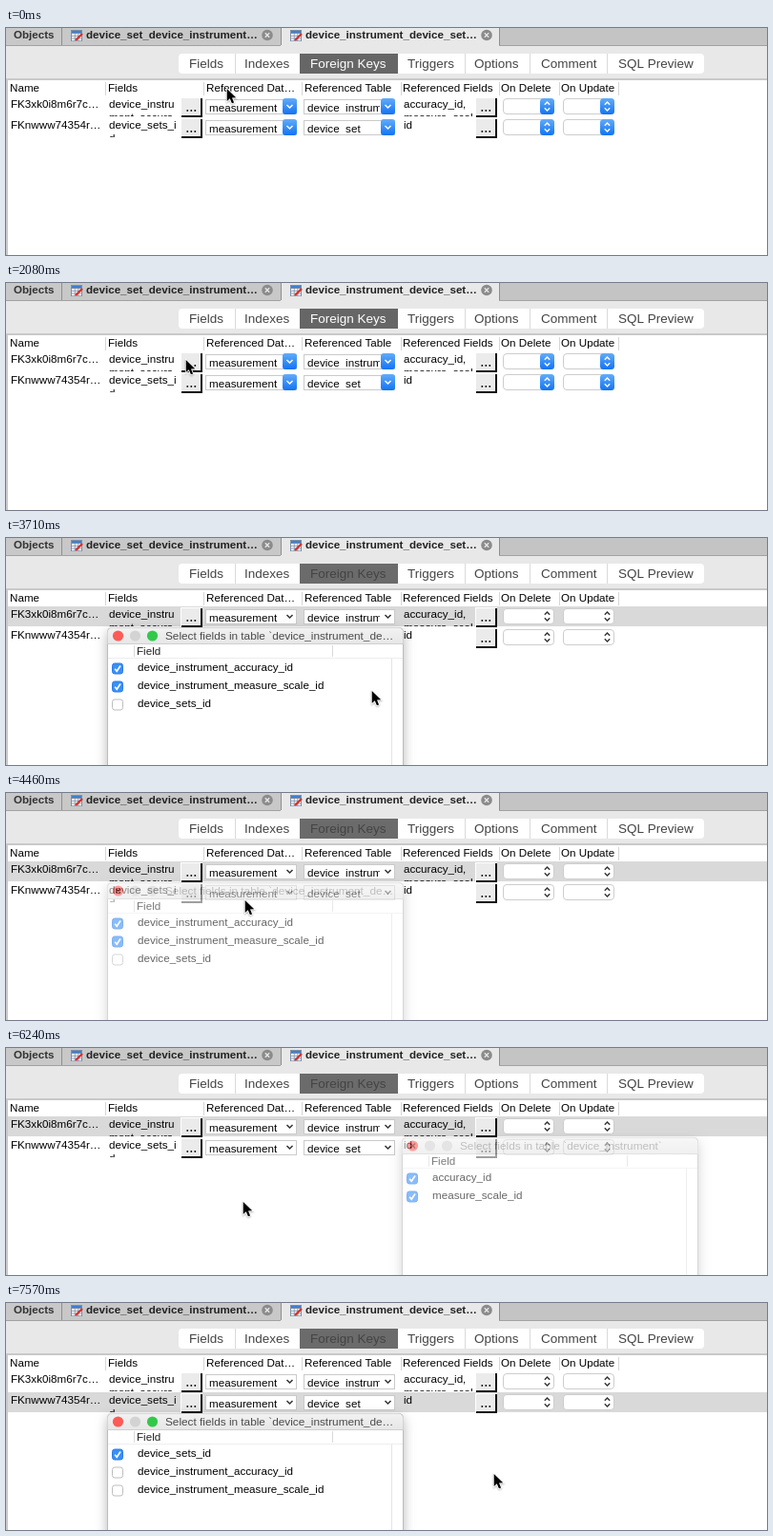
An HTML page with a canvas that plays this animation: 798 px wide and 239 px high, repeating every 8000 ms.

```html
<!DOCTYPE html>
<html lang="en">
<head>
<meta charset="utf-8">
<title>Foreign key editor</title>
<style>
html, body { margin: 0; width: 100%; height: 100%; overflow: hidden; background: #fff; }
canvas { display: block; width: 798px; height: 239px; }
</style>
</head>
<body>
<canvas id="stage" width="798" height="239"></canvas>
<script>
const ctx = document.getElementById('stage').getContext('2d');
const layer = document.createElement('canvas');
const LOOP = 8000;
const FACE = '"Liberation Sans", Arial, sans-serif';
const BODY = `11.65px ${FACE}`;
const TITLE = `11.8px ${FACE}`;
const BOLD = `bold 11.6px ${FACE}`;
const SEGMENT = `13.5px ${FACE}`;

const DIALOGS = {
  first: {
    x: 106, y: 94, title: 'Select fields in table `device_instrument_de…',
    fields: [['device_instrument_accuracy_id', true], ['device_instrument_measure_scale_id', true], ['device_sets_id', false]]
  },
  second: {
    x: 415, y: 94, title: 'Select fields in table `device_instrument`',
    fields: [['accuracy_id', true], ['measure_scale_id', true]]
  },
  third: {
    x: 106, y: 116, title: 'Select fields in table `device_instrument_de…',
    fields: [['device_sets_id', true], ['device_instrument_accuracy_id', false], ['device_instrument_measure_scale_id', false]]
  }
};

// Each phase holds until the next one starts.
const PHASES = [
  { at: 0, row: -1, active: true },
  { at: 2230, row: 0, active: true },
  { at: 2380, row: 0, dialog: 'first' },
  { at: 4457, row: 0, dialog: 'first', closing: true, alpha: 0.6 },
  { at: 4605, row: 0, active: true },
  { at: 4752, row: 0, dialog: 'second', alpha: 0.6 },
  { at: 4900, row: 0, dialog: 'second' },
  { at: 6238, row: 0, dialog: 'second', closing: true, alpha: 0.6 },
  { at: 6386, row: 0, active: true },
  { at: 6683, row: 1, active: true },
  { at: 6831, row: 1, dialog: 'third', alpha: 0.6 },
  { at: 6980, row: 1, dialog: 'third' }
];

// Pointer strokes: evenly timed stops between the first and last moment.
const STROKES = [
  [0, 0, [[231, 63]]],
  [150, 450, [[206, 77], [168, 86], [187, 84]]],
  [1050, 2080, [[205, 84], [240, 86], [268, 87], [285, 85], [286, 86], [255, 84], [215, 82], [188, 80]]],
  [2680, 3120, [[175, 108], [152, 146], [146, 164], [145, 134]]],
  [3420, 3420, [[146, 149]]],
  [3710, 4010, [[383, 160], [430, 161], [442, 156]]],
  [4310, 4900, [[117, 102], [250, 112], [420, 95], [495, 87], [495, 86]]],
  [5200, 5640, [[490, 110], [479, 140], [474, 162], [480, 150]]],
  [5940, 6980, [[450, 118], [425, 101], [248, 161], [215, 130], [192, 107], [190, 102], [188, 104], [176, 121]]],
  [7130, 7570, [[230, 150], [350, 175], [470, 178], [511, 179]]]
];

function pointerAt(t) {
  const [from, to, stops] = STROKES.filter(s => s[0] <= t + 2).pop();
  const last = stops.length - 1;
  const step = last ? Math.floor((t + 4 - from) / (to - from) * last) : 0;
  return stops[Math.max(0, Math.min(last, step))];
}

function rect(x, y, w, h, color) {
  ctx.fillStyle = color;
  ctx.fillRect(x, y, w, h);
}

function round(x, y, w, h, r, fill, stroke) {
  ctx.beginPath();
  ctx.roundRect(x, y, w, h, r);
  if (fill) { ctx.fillStyle = fill; ctx.fill(); }
  if (stroke) { ctx.strokeStyle = stroke; ctx.lineWidth = 1; ctx.stroke(); }
}

function disc(x, y, r, color) {
  ctx.beginPath();
  ctx.arc(x, y, r, 0, Math.PI * 2);
  ctx.fillStyle = color;
  ctx.fill();
}

function line(points, color, width) {
  ctx.beginPath();
  points.forEach(([x, y]) => ctx.lineTo(x, y));
  ctx.strokeStyle = color;
  ctx.lineWidth = width;
  ctx.stroke();
}

function cross(x, y, r, color, width) {
  line([[x - r, y - r], [x + r, y + r]], color, width);
  line([[x - r, y + r], [x + r, y - r]], color, width);
}

function text(str, x, y, font = BODY, color = '#000') {
  ctx.font = font;
  ctx.fillStyle = color;
  ctx.fillText(str, x, y);
}

function clipped(x, y, w, h, draw) {
  ctx.save();
  ctx.beginPath();
  ctx.rect(x, y, w, h);
  ctx.clip();
  draw();
  ctx.restore();
}

function shade(y, h, top, bottom) {
  const g = ctx.createLinearGradient(0, y, 0, y + h);
  g.addColorStop(0, top);
  g.addColorStop(1, bottom);
  return g;
}

const blue = (y, h) => shade(y, h, '#62acf9', '#1273f4');

function tableIcon(x, y) {
  rect(x, y, 12, 12, '#7d8fa8');
  rect(x + 1, y + 1, 10, 2, '#3f7fd0');
  for (let i = 0; i < 9; i++) {
    rect(x + 1 + (i % 3) * 3.6, y + 4 + Math.floor(i / 3) * 2.7, 2.8, 1.9, '#f4f8fd');
  }
  line([[x + 5, y + 11], [x + 12, y + 4]], '#d8322a', 2.4);
}

function tab(x, label) {
  tableIcon(x, 2);
  text(label, x + 16, 11, BOLD, '#222');
  disc(x + 206, 7.5, 5.8, '#8b8b8b');
  cross(x + 206, 7.5, 2.2, '#e6e6e6', 1.4);
}

function tabBar() {
  rect(0, 0, 798, 19, '#c4c4c4');
  rect(0, 0, 288, 18, '#c8c8c8');
  rect(0, 18, 798, 1, '#a2a2a2');
  rect(288, 0, 229, 19, '#e8e8e8');
  [58, 288, 517].forEach(x => rect(x, 0, 1, 18, '#8e8e8e'));
  text('Objects', 8, 11, BOLD, '#333');
  tab(68, 'device_set_device_instrument…');
  tab(298, 'device_instrument_device_set…');
}

function segments(active) {
  rect(0, 19, 798, 37, '#e8e8e8');
  round(181, 27, 551, 21, 4, '#fff');
  [240, 481, 549, 630].forEach(x => rect(x, 27, 1, 21, '#dadada'));
  rect(308, 27, 103, 21, active ? '#666' : '#6b6b6b');
  const labels = [['Fields', 192], ['Indexes', 250], ['Foreign Keys', 319], ['Triggers', 421],
    ['Options', 491], ['Comment', 561], ['SQL Preview', 642]];
  labels.forEach(([label, x]) => {
    const lit = active && label === 'Foreign Keys';
    text(label, x, 42, SEGMENT, lit ? '#fff' : '#444');
  });
}

function header() {
  rect(0, 53, 798, 186, '#c9c9c9');
  rect(2, 55, 796, 184, '#fff');
  const names = [['Name', 4], ['Fields', 107], ['Referenced Dat…', 210], ['Referenced Table', 313],
    ['Referenced Fields', 416], ['On Delete', 519], ['On Update', 582]];
  names.forEach(([name, x]) => text(name, x, 67));
  [104, 207, 310, 414, 517, 580, 642].forEach(x => rect(x, 57, 1, 14, '#d6d6d6'));
}

function moreButton(x, y) {
  rect(x, y, 23, 21, '#fff');
  rect(x + 1, y + 1, 22, 20, '#111');
  rect(x + 1, y + 1, 20, 18, '#ebebeb');
  for (let i = 0; i < 3; i++) rect(x + 6.5 + i * 4, y + 13, 1.6, 1.8, '#111');
}

function combo(x, y, label, active) {
  rect(x, y, 96, 16, '#cacaca');
  rect(x + 1, y + 1, 94, 14, '#fff');
  clipped(x + 1, y, 79, 14, () => text(label, x + 4, y + 13));
  if (active) round(x + 81, y - 1, 15, 17, 3, blue(y - 1, 17));
  line([[x + 85.5, y + 6], [x + 88.5, y + 9], [x + 91.5, y + 6]], active ? '#fff' : '#333', 1.5);
}

function popup(x, y, active) {
  round(x + 0.5, y + 0.5, 53, 16, 3.5, '#fff', '#cdcdcd');
  if (active) round(x + 39, y, 15, 17, 3.5, blue(y, 17));
  const color = active ? '#fff' : '#333';
  const cx = x + 46.5;
  line([[cx - 2.7, y + 6.7], [cx, y + 4], [cx + 2.7, y + 6.7]], color, 1.4);
  line([[cx - 2.7, y + 10.3], [cx, y + 13], [cx + 2.7, y + 10.3]], color, 1.4);
}

function row(y, data, selected, active) {
  if (selected) rect(2, y - 1, 796, 21, active ? '#116cd6' : '#d9d9d9');
  const ink = selected && active ? '#fff' : '#000';
  text(data.name, 5, y + 11, BODY, ink);
  const lines = (pair, x) => clipped(x - 1, y, 75, 20, () => {
    pair.forEach((part, i) => text(part, x, y + 11 + i * 14, BODY, ink));
  });
  lines(data.fields, 108);
  lines(data.refs, 417);
  moreButton(183, y);
  moreButton(492, y);
  combo(209, y + 2, 'measurement', active);
  combo(312, y + 2, data.table, active);
  popup(521, y + 1, active);
  popup(584, y + 1, active);
}

const ROWS = [
  { name: 'FK3xk0i8m6r7c…', fields: ['device_instru', 'ment_accura'], refs: ['accuracy_id,', 'measure_scal'], table: 'device_instrument' },
  { name: 'FKnwww74354r…', fields: ['device_sets_i', 'd'], refs: ['id'], table: 'device_set' }
];

function checkbox(x, y, on) {
  round(x - 5.5, y - 5.5, 11, 11, 2.5, on ? '#3b8ff6' : '#fff', on ? '#2b7de6' : '#bdbdbd');
  if (on) line([[x - 2.8, y + 0.2], [x - 0.8, y + 2.8], [x + 3, y - 3]], '#fff', 1.6);
}

function dialog({ x, y, title, fields }, closing) {
  ctx.save();
  ctx.shadowColor = 'rgba(0,0,0,0.28)';
  ctx.shadowBlur = 12;
  ctx.shadowOffsetY = 4;
  round(x, y, 311, 180, [5, 5, 0, 0], '#bcbcbc');
  ctx.restore();
  round(x + 0.5, y + 0.5, 310, 17, [5, 5, 0, 0], shade(y, 18, '#f2f2f2', '#e6e6e6'));
  rect(x + 1, y + 18, 309, 170, '#fff');
  rect(x, y + 17, 311, 1, '#d0d0d0');
  rect(x + 1, y + 32, 309, 1, '#ededed');
  rect(x + 298, y + 33, 1, 150, '#e4e4e4');
  [28, 236].forEach(dx => rect(x + dx, y + 19, 1, 12, '#d9d9d9'));
  disc(x + 11.5, y + 9, 5.6, '#fc5b57');
  disc(x + 29.5, y + 9, 5.6, '#d3d3d3');
  disc(x + 47.5, y + 9, 5.6, closing ? '#d3d3d3' : '#34c84a');
  if (closing) cross(x + 11.5, y + 9, 2.5, '#6b0d0a', 1.3);
  text(title, x + 61, y + 13, TITLE, closing ? '#949494' : '#4a4a4a');
  text('Field', x + 31, y + 29, BODY, '#222');
  fields.forEach(([name, on], i) => {
    checkbox(x + 11, y + 43.5 + i * 19, on);
    text(name, x + 32, y + 46 + i * 19);
  });
}

function pointer([x, y]) {
  const shape = [[0, 0], [0, 14.5], [3.4, 11.5], [5.8, 17], [8.2, 16], [5.9, 10.6], [10.6, 10.4]];
  ctx.save();
  ctx.translate(x + 0.7, y + 1);
  ctx.scale(0.9, 0.9);
  ctx.beginPath();
  shape.forEach(([px, py]) => ctx.lineTo(px, py));
  ctx.closePath();
  ctx.shadowColor = 'rgba(0,0,0,0.3)';
  ctx.shadowBlur = 2;
  ctx.shadowOffsetY = 1;
  ctx.lineWidth = 1.8;
  ctx.strokeStyle = '#fff';
  ctx.stroke();
  ctx.shadowColor = 'transparent';
  ctx.fillStyle = '#000';
  ctx.fill();
  ctx.restore();
}

function draw(t) {
  const phase = PHASES.filter(p => p.at <= t + 2).pop();
  const active = Boolean(phase.active);
  tabBar();
  segments(active);
  header();
  ROWS.forEach((data, i) => row(73 + i * 22, data, phase.row === i, active));
  if (phase.dialog) {
    // Fade the window as one layer over the table.
    const alpha = phase.alpha || 1;
    if (alpha < 1) {
      layer.width = 798;
      layer.height = 239;
      layer.getContext('2d').drawImage(ctx.canvas, 0, 0);
    }
    dialog(DIALOGS[phase.dialog], phase.closing);
    if (alpha < 1) {
      ctx.globalAlpha = 1 - alpha;
      ctx.drawImage(layer, 0, 0);
      ctx.globalAlpha = 1;
    }
  }
  pointer(pointerAt(t));
}

function tick() {
  draw(performance.now() % LOOP);
  requestAnimationFrame(tick);
}
tick();
</script>
</body>
</html>
```
